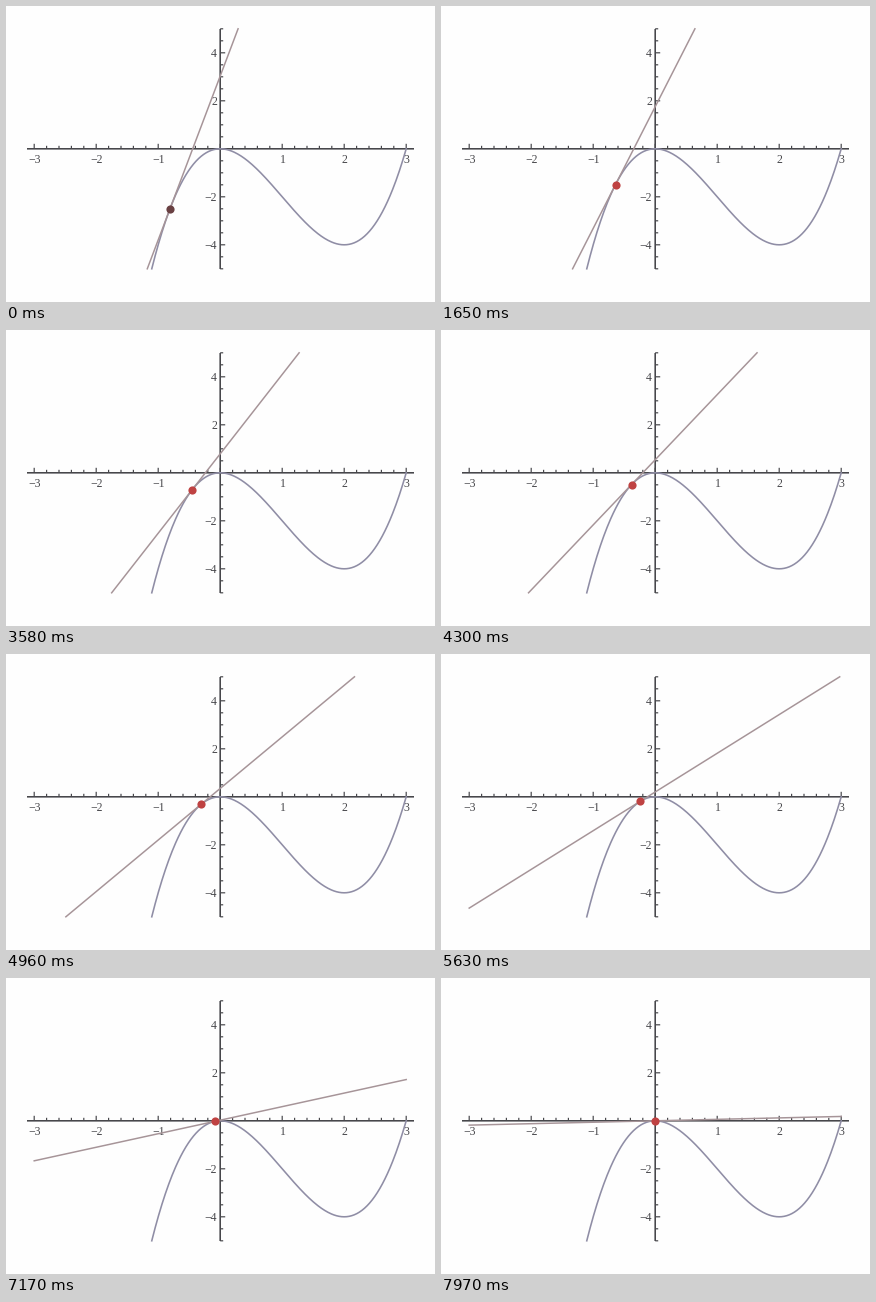
Animation of 429 by 296 pixels, one loop 8 s. Source, as a matplotlib script:

```python
import numpy as np
import matplotlib.pyplot as plt
from matplotlib.animation import FuncAnimation
from matplotlib.collections import LineCollection

W, H, DPI = 429, 296, 100
PT = 72 / DPI                  # points per pixel
OX, OY = 214.2, 142.8          # origin on the stage
UX, UY = 62.0, 24.0            # pixels per unit
LOOP, TICK = 8000, 20
STEP = 66.3                    # the picture moves about 15 times a second
INK = "#47474b"
DOT_START = np.array([0.41, 0.25, 0.26])
DOT_END = np.array([0.75, 0.26, 0.26])

fig = plt.figure(figsize=(W / DPI, H / DPI), dpi=DPI, facecolor="#fefefe")
ax = fig.add_axes([0, 0, 1, 1])
ax.set_xlim(0, W)
ax.set_ylim(H, 0)
ax.axis("off")


def px(x):
    return OX + UX * x


def py(y):
    return OY - UY * y


def f(x):
    return x**3 - 3 * x**2


def slope(x):
    return 3 * x**2 - 6 * x


def label(x, y, n, ha):
    text = str(n).replace("-", "\u2212")
    ax.text(x, y, text, ha=ha, va="center_baseline", color=INK,
            family="Liberation Serif", size=11.8 * PT)


def add_lines(lines, width):
    group = LineCollection(lines, colors=INK, linewidths=width * PT, zorder=2)
    group.set_snap(False)
    ax.add_collection(group)


def draw_axes():
    add_lines([[(21, OY), (408, OY)], [(OX, 23), (OX, 263)]], 1.6)
    ticks = []
    for i in range(-15, 16):
        size = 5 if i % 5 == 0 else 3
        x = px(i / 5)
        ticks.append([(x, OY), (x, OY - size)])
    for i in range(-10, 11):
        size = 5 if i % 4 == 0 else 3
        y = py(i / 2)
        ticks.append([(OX, y), (OX + size, y)])
    add_lines(ticks, 1.2)
    for n in (-3, -2, -1, 1, 2, 3):
        label(px(n) + 0.3, 152.3, n, "center")
    for n in (-4, -2, 2, 4):
        label(211, py(n), n, "right")


draw_axes()

xs = np.linspace(-1.1038, 3, 300)
ax.plot(px(xs), py(f(xs)), color="#8f8da5", lw=1.6 * PT, zorder=3)
tangent, = ax.plot([], [], color="#a69498", lw=1.5 * PT, zorder=3, snap=False)
dot, = ax.plot([], [], "o", ms=8.2 * PT, mew=0, zorder=5, snap=False)


def update(i):
    k = int(i * TICK / STEP + 0.35)
    a = round(-0.81 + 0.802 * k / 120, 2)    # slider moves in hundredths
    m = slope(a)
    c = f(a) - m * a
    x = np.array([max(-3, (-5 - c) / m), min(3, (5 - c) / m)])
    tangent.set_data(px(x), py(m * x + c))
    dot.set_data([px(a)], [py(f(a))])
    mix = min(1, k / 12)
    dot.set_color(DOT_START + (DOT_END - DOT_START) * mix)
    return tangent, dot


anim = FuncAnimation(fig, update, frames=LOOP // TICK, interval=TICK,
                     repeat=True, repeat_delay=0, blit=False)
plt.show()
```
